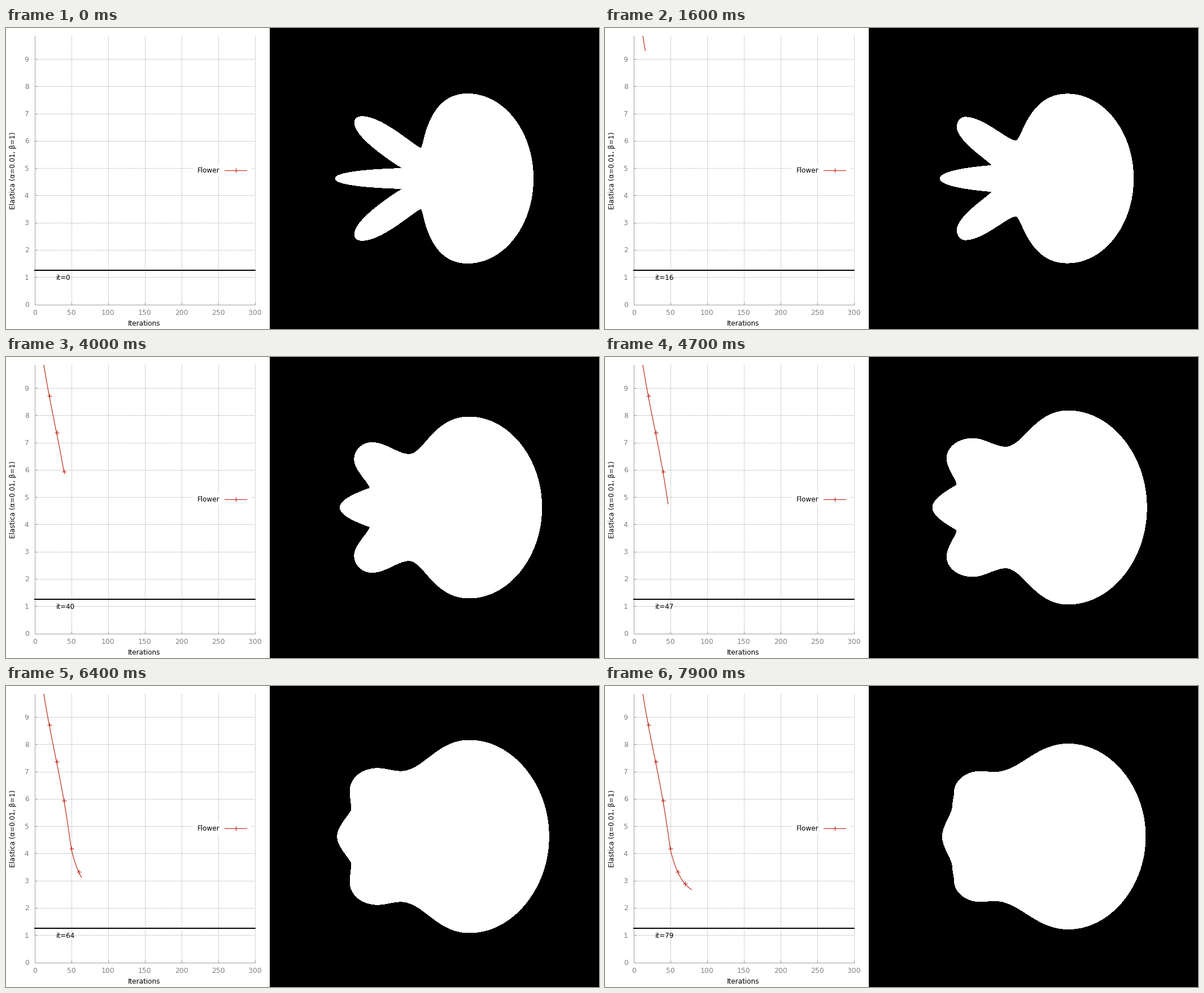
Write a matplotlib script that moves like this. It is 1050 px wide and 533 px high and loops after 8 s.

```python
import numpy as np
import matplotlib.pyplot as plt
from matplotlib.animation import FuncAnimation
from matplotlib.patches import Polygon, Rectangle

W, H, DPI = 1050, 533, 100
STEPS = 80                        # one iteration per 100 ms
PX = 72 / DPI                     # one pixel in points
GRAY, RED = "#808080", "#c0392b"
LEFT, RIGHT, TOP, BASE = 50.5, 440.5, 13.5, 489.5
MID = H / 2                       # mirror axis of the blob

plt.rcParams["font.family"] = "DejaVu Sans"

fig = plt.figure(figsize=(W / DPI, H / DPI), dpi=DPI, facecolor="white")
ax = fig.add_axes([0, 0, 1, 1])
ax.set_xlim(0, W)
ax.set_ylim(H, 0)
ax.axis("off")


def px_x(it):
    return LEFT + 1.3 * np.asarray(it)


def px_y(value):
    return BASE - 48.27 * np.asarray(value)


def line(xs, ys, color, width=1, **kw):
    return ax.plot(xs, ys, color=color, lw=width * PX, **kw)[0]


def label(x, y, text, size=12, **kw):
    kw = {"va": "baseline", "color": "black", **kw}
    return ax.text(x, y, text, fontsize=size * PX, **kw)


# ---- chart ----
dots = dict(linestyle=(0, (1, 2)), zorder=1)
for v in range(10):
    y = px_y(v)
    if v:
        line([LEFT, RIGHT], [y, y], GRAY, **dots)
    line([LEFT, LEFT + 4], [y, y], GRAY, 0.8)
    label(40.5, y + 4.5, str(v), 12.4, color=GRAY, ha="right")
for n in range(0, 301, 50):
    x = px_x(n)
    if n:
        line([x, x], [TOP, BASE], GRAY, **dots)
    line([x, x], [BASE - 4, BASE], GRAY, 0.8)
    label(x + 0.3, 507.5, str(n), 12.4, color=GRAY, ha="center")
line([LEFT, LEFT], [TOP, BASE], "#a0a0a0")
line([LEFT, RIGHT], [BASE, BASE], "#a0a0a0")
line([50, 442], [429, 429], "black", 2, solid_capstyle="butt")
label(245, 527, "Iterations", ha="center")
label(16, 252, "Elastica (α=0.01, β=1)", rotation=90,
      rotation_mode="anchor", ha="center")

# legend
ax.add_patch(Rectangle((331, 242), 104, 20, color="white", lw=0, zorder=2))
label(379, 256, "Flower", ha="right", zorder=4)
line([387, 426], [252, 252], RED, 1.2, zorder=4)
plus = dict(marker="+", markersize=8 * PX, markeredgewidth=1.2 * PX)
line([406.5], [252], RED, zorder=4, **plus)

clip = Rectangle((LEFT, TOP), RIGHT - LEFT, BASE - TOP, transform=ax.transData)
curve = line([], [], RED, 1.3, zorder=5)
marks = line([], [], RED, linestyle="none", zorder=5, **plus)
curve.set_clip_path(clip)
marks.set_clip_path(clip)
counter = label(89, 446, "", zorder=6)

# ---- blob ----
ax.add_patch(Rectangle((467, 0), W - 467, H, color="black", lw=0, zorder=2))
blob = Polygon([(0, 0), (1, 0), (1, 1)], closed=True, fc="white", ec="none",
               antialiased=False, zorder=3)
ax.add_patch(blob)

HORIZ, VERT = np.array([1, 0]), np.array([0, 1])


def energy(it):
    """Steep, nearly straight fall up to 50, then exponential decay."""
    d = it - 30
    fall = 7.36 - 0.1342 * d - 3e-4 * d**2 - 4.83e-5 * d**3
    return np.where(it < 50, fall, 2.4 + 1.77 * np.exp((50 - it) / 15.5))


def progress(it):
    return np.interp(it, [0, 30, 40, 54, 79], [0, 0.5, 0.68, 0.91, 1])


def half_height(it):
    return np.interp(it, [0, 20, 30, 40, 50, 54, 64, 79],
                     [150, 149.5, 152.5, 160.5, 176, 172.5, 170.5, 164])


def bezier(a, b, axis_a, pull_a, axis_b, pull_b):
    """Cubic from a to b, leaving along axis_a and arriving along axis_b."""
    a, b = np.array(a), np.array(b)
    c = a + pull_a * (b - a) * axis_a
    d = b - pull_b * (b - a) * axis_b
    t = np.linspace(0, 1, 40)[:, None]
    return ((1 - t)**3 * a + 3 * t * (1 - t)**2 * c
            + 3 * t**2 * (1 - t) * d + t**3 * b)


def outline(it):
    p, q, s = progress(it), it / (STEPS - 1), half_height(it)
    late = q**4
    round_off = 0.552 - 0.015 * p

    # Extremes of the upper half, seen from below the crown, y upwards.
    right = (s * (0.777 + 0.055 * p**2), 0)
    crown = (0, s)
    notch = (-82 - 48 * q, s * (0.357 + 0.338 * p))
    ear_top = (-187 + 30 * q, s * (0.732 - 0.03 * q))
    ear_side = (-s * (1.333 - 0.1 * p), s * (0.663 - 0.195 * p))
    cusp = (-s * (0.763 + 0.487 * p), s * (0.12 + 0.13 * p + 0.09 * late))
    tip = (-s * (1.56 - 0.2 * p), 0)

    half = np.vstack([
        bezier(right, crown, VERT, round_off, HORIZ, round_off),
        bezier(crown, notch, HORIZ, 0.88 - 0.43 * p, HORIZ, 0.06 + 0.28 * p),
        bezier(notch, ear_top, HORIZ, 0.08 + 0.32 * p, HORIZ, 0.36),
        bezier(ear_top, ear_side, HORIZ, 0.55, VERT, 0.55),
        bezier(ear_side, cusp, VERT, 0.37, VERT, 0.25 * p),
        bezier(cusp, tip, VERT, 0.3 * late, VERT, 0.87 - 0.52 * p)])
    whole = np.vstack([half, half[::-1] * [1, -1]])
    return [817 + 3.5 * np.sqrt(p), MID] + whole * [1, -1]


def draw(it):
    its = np.arange(it + 1)
    tens = its[::10]
    curve.set_data(px_x(its), px_y(energy(its)))
    marks.set_data(px_x(tens), px_y(energy(tens)))
    counter.set_text(f"it={it}")
    blob.set_xy(outline(it))
    return curve, marks, counter, blob


ani = FuncAnimation(fig, draw, frames=STEPS, interval=100, repeat=True,
                    repeat_delay=0, init_func=lambda: draw(0))
plt.show()
```
